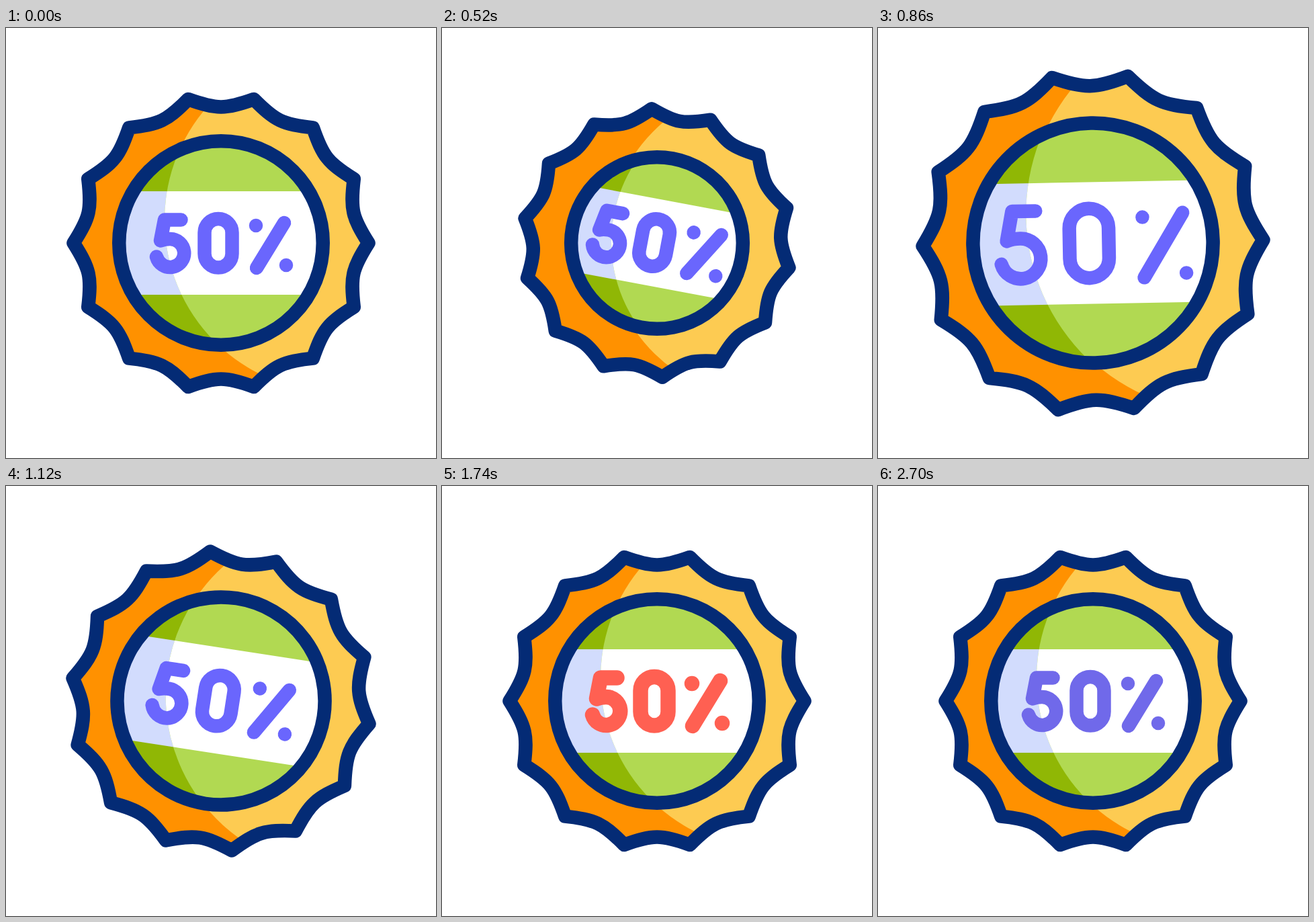
Recreate the animation shown at these times as an HTML page. Size 640 by 640 pixels, loop 3000 ms.

```html
<!DOCTYPE html>
<html lang="en">
<head>
<meta charset="utf-8">
<title>50% badge</title>
<style>
  @property --turn  { syntax: "<angle>";  inherits: true; initial-value: 0deg; }
  @property --star  { syntax: "<number>"; inherits: true; initial-value: 1; }
  @property --disc  { syntax: "<number>"; inherits: true; initial-value: 1; }
  @property --label { syntax: "<number>"; inherits: true; initial-value: 1; }

  html, body { margin: 0; width: 100%; height: 100%; overflow: hidden; background: #fff; }
  svg { display: block; width: 100%; height: 100%; }

  #badge {
    transform: rotate(var(--turn));
    animation: wobble 3s cubic-bezier(.333, 0, .667, 1) infinite,
               bounce 3s cubic-bezier(.333, 0, .667, 1) infinite;
  }
  #star  { --s: var(--star); }
  #disc  { --s: var(--disc); }
  #label { --s: var(--label); }
  .part { transform: scale(var(--s)); }

  /* Outlines keep their weight while the shapes grow and shrink. */
  .line {
    fill: none; stroke: #042b75; stroke-linejoin: round;
    stroke-width: calc(20.5px / var(--s));
  }
  #label {
    --w: 20.5px;
    fill: none; stroke: #6a66fd; stroke-linecap: round; stroke-linejoin: round;
    stroke-width: calc(var(--w) / var(--s));
    animation: blink 3s step-end infinite;
  }

  @keyframes wobble {
    0%, 58%, 100% { --turn: 0deg; }
    14.667%, 16.333% { --turn: 12deg; }
    23.4% { --turn: -12deg; }
    34.667% { --turn: 12deg; }
    46.333% { --turn: -12deg; }
  }
  @keyframes bounce {
    0%, 40.333%, 100% { --star: 1; --disc: 1; --label: 1; }
    14.667%, 16.333% { --star: .89; --disc: .815; --label: .937; }
    23% { --star: 1.207; --disc: 1.237; --label: 1.57; }
  }
  @keyframes blink {
    0%, 63.2%, 76.55% { stroke: #6a66fd; --w: 20.5px; }
    57.8%, 69.9%, 83.2% { stroke: #ff6052; --w: 22.5px; }
    75.9%, 82.55% { stroke: #b463a7; --w: 21.5px; }
    89.9%, 100% { stroke: #7069ea; --w: 20.5px; }
  }
</style>
</head>
<body>
<svg viewBox="0 0 640 640">
  <defs>
    <path id="rim"/>
    <circle id="face" r="151.75"/>
    <clipPath id="inRim"><use href="#rim"/></clipPath>
    <clipPath id="inFace"><use href="#face"/></clipPath>
    <clipPath id="lit"><circle cx="172" cy="-34" r="256"/></clipPath>
  </defs>
  <g transform="translate(320 320)">
    <g id="badge">
      <g id="star" class="part">
        <use href="#rim" fill="#ff9100"/>
        <g clip-path="url(#inRim)">
          <circle cx="172" cy="-34" r="256" fill="#fdcb52"/>
        </g>
        <use href="#rim" class="line"/>
      </g>
      <g id="disc" class="part">
        <g clip-path="url(#inFace)">
          <rect x="-160" y="-160" width="320" height="320" fill="#90b705"/>
          <rect x="-160" y="-77" width="320" height="154" fill="#d2dcfd"/>
          <g clip-path="url(#lit)">
            <rect x="-160" y="-160" width="320" height="320" fill="#b1d952"/>
            <rect x="-160" y="-77" width="320" height="154" fill="#fff"/>
          </g>
        </g>
        <use href="#face" class="line"/>
      </g>
      <g id="label" class="part" role="img" aria-label="50%">
        <path d="M-59.5-34.5H-84L-90-3.5Q-84-6-76-6A21 21 0 1 1-96 20.5"/>
        <rect x="-24.5" y="-36" width="41" height="72.5" rx="20.5"/>
        <path d="M94-30L53 37M52-26h.01M97 33h.01"/>
      </g>
    </g>
  </g>
</svg>
<script>
  const TIPS = 14, TIP_RADIUS = 219.5, DIP_RADIUS = 198.8, DIP_SPREAD = 0.03;
  const step = 2 * Math.PI / TIPS;
  const polar = (radius, angle) =>
    `${(radius * Math.cos(angle)).toFixed(2)} ${(radius * Math.sin(angle)).toFixed(2)}`;

  // Each scallop leaves its tips almost straight and rounds off in the middle.
  const scallop = i => {
    const middle = (i + 0.5) * step;
    return `C${polar(DIP_RADIUS, middle - DIP_SPREAD)} ` +
           `${polar(DIP_RADIUS, middle + DIP_SPREAD)} ${polar(TIP_RADIUS, (i + 1) * step)}`;
  };
  const scallops = Array.from({ length: TIPS }, (_, i) => scallop(i)).join("");
  document.getElementById("rim").setAttribute("d", `M${polar(TIP_RADIUS, 0)}${scallops}Z`);
</script>
</body>
</html>
```
